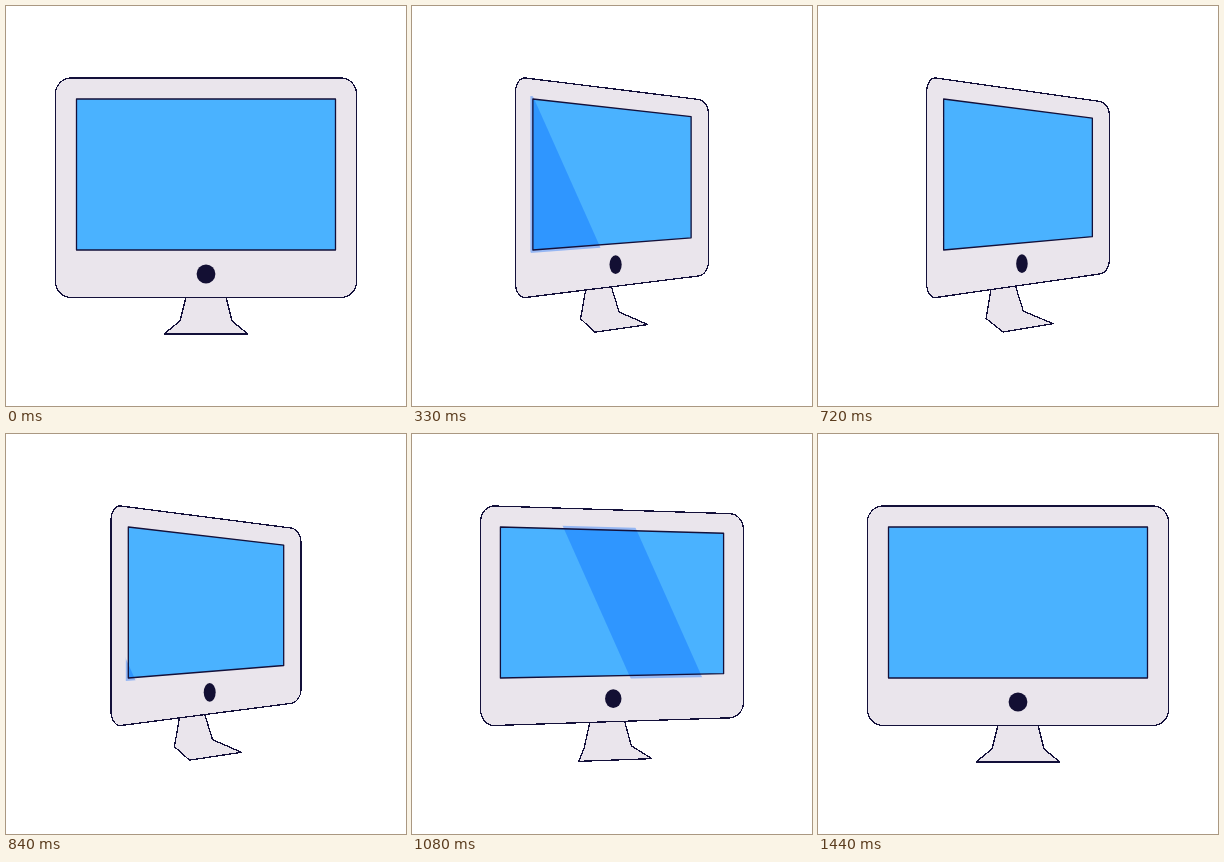
These frames come from a looping animation (400x400 px, 2.62 s). An HTML page:

```html
<!DOCTYPE html>
<html lang="en">
<head>
<meta charset="utf-8">
<title>Turning monitor</title>
<style>
  html, body { margin: 0; height: 100%; overflow: hidden; background: #fff; }
  svg { display: block; width: 100%; height: 100%; }
  .shell, #frame { stroke: #13103a; stroke-width: 1.3; stroke-linejoin: round; }
  .shell { fill: #eae5ec; shape-rendering: crispEdges; }
  #screen { fill: #4ab2ff; }
  #frame { fill: none; }
  #button { fill: #130f33; }
  .shine { fill: #0064ff; fill-opacity: .36; }
</style>
</head>
<body>
<svg viewBox="0 0 400 400">
  <clipPath id="clip"><path id="mask"/></clipPath>
  <path id="stand" class="shell"/>
  <path id="body" class="shell"/>
  <path id="screen"/>
  <ellipse id="button"/>
  <g clip-path="url(#clip)">
    <path id="shine1" class="shine"/>
    <path id="shine2" class="shine"/>
  </g>
  <path id="frame"/>
</svg>
<script>
const LOOP = 2620, STEP = 30, LAST = 1440;
const TURN = 600, SWEEP = 892, SECOND_SWEEP = 608;

// half: half width, squeeze: its loss when turned,
// drop and rise: slant of the top and bottom edge, rx and ry: corner size as part of an edge
const body = { half: 150.5, top: 72, bottom: 291.5, squeeze: 60, drop: 26.6, rise: 26.7, rx: .052, ry: .072 };
const screen = { half: 129.5, top: 93, bottom: 244, squeeze: 56, drop: 19.5, rise: 13.5, rx: 0, ry: 0 };
const mask = { ...screen, half: 132, top: 90, bottom: 247 };

const standFront = [[181.5, 285], [218.5, 285], [226, 315], [242, 328], [158, 328], [174, 315]];
const standTurned = [[174.3, 275], [195.6, 275], [205, 305], [235, 317.5], [185.5, 326], [168, 312.5]];

const set = (id, attrs) => {
  for (const name in attrs) document.getElementById(id).setAttribute(name, attrs[name]);
};
const clamp = v => Math.min(1, Math.max(0, v));
const smooth = v => v * v * (3 - 2 * v);
const mix = (a, b, k) => a.map((v, i) => v + (b[i] - v) * k);
const polygon = points => "M" + points.join("L") + "Z";

// cubic-bezier(.333, 0, 0, 1)
function ease(x) {
  let lo = 0, hi = 1;
  for (let i = 0; i < 30; i++) {
    const s = (lo + hi) / 2;
    if (s * (1 - s) ** 2 + s ** 3 < x) lo = s; else hi = s;
  }
  return smooth(lo);
}

// A panel whose right side recedes as p goes from 0 to 1
function panel({ half, top, bottom, squeeze, drop, rise, rx, ry }, p) {
  const w = half - squeeze * p;
  const upper = u => [200 + w * (2 * u - 1), top + p * drop * (u - rx)];
  const lower = u => [200 + w * (2 * u - 1), bottom - p * rise * (u - rx)];
  const corners = [upper(0), upper(1), lower(1), lower(0)];
  if (!rx) return polygon(corners);
  return polygon(corners.map((c, i) => {
    const [before, after] = i % 2 ? [rx, ry] : [ry, rx];
    const from = mix(c, corners[(i + 3) % 4], before);
    const to = mix(c, corners[(i + 1) % 4], after);
    return `${from}C${mix(from, c, .55)} ${mix(to, c, .55)} ${to}`;
  }));
}

function shine(t) {
  const x = -84.5 + 431 * smooth(clamp(t / SWEEP));
  return polygon([[x, 90], [x + 72, 90], [x + 142, 247], [x + 70, 247]]);
}

function draw(t) {
  const p = ease(clamp(1 - Math.abs(t - TURN) / TURN));
  set("stand", { d: polygon(standFront.map((v, i) => mix(v, standTurned[i], p))) });
  set("body", { d: panel(body, p) });
  set("screen", { d: panel(screen, p) });
  set("frame", { d: panel(screen, p) });
  set("mask", { d: panel(mask, p) });
  set("button", { cx: 200 + 4 * p, cy: 268 - 10.5 * p, rx: 9.4 - 3.7 * p, ry: 9.4 });
  set("shine1", { d: shine(t) });
  set("shine2", { d: shine(t - SECOND_SWEEP) });
}

const start = performance.now();
function tick() {
  const t = (performance.now() - start) % LOOP;
  draw(Math.min(LAST, Math.floor(t / STEP) * STEP));
  requestAnimationFrame(tick);
}
tick();
</script>
</body>
</html>
```
